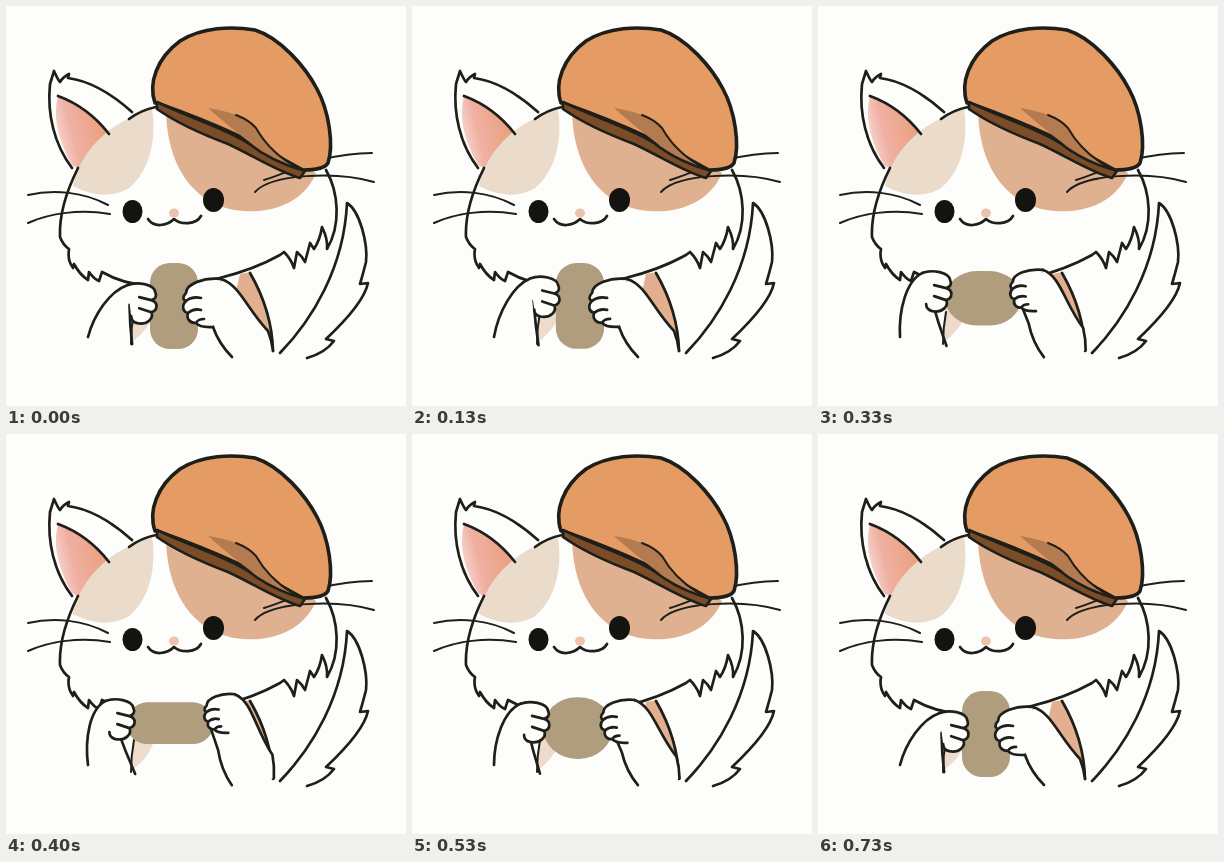
Write an HTML page without scripts that moves like this. It is 400 by 400 pixels and loops after 800 ms.

```html
<!DOCTYPE html>
<html lang="en">
<head>
<meta charset="utf-8">
<title>Cat with dough</title>
<style>
  @property --k { syntax: "<number>"; inherits: true; initial-value: 0; }
  @keyframes knead { from { --k: 0; } to { --k: 12; } }

  html, body { margin: 0; width: 100%; height: 100%; overflow: hidden; background: #fdfdfc; }

  /* --k counts twelve drawings; every moving part follows from it */
  svg {
    display: block; width: 100vw; height: 100vh;
    animation: knead 800ms steps(12) -4ms infinite;
    --pull: pow(cos((var(--k) - 6.3) * 15deg), 6);
    --lift: sin((var(--k) + .5) * 15deg);
    --round: calc(4 * var(--pull) * (1 - var(--pull)));
    --left: calc(-6 * var(--lift) - 17 * var(--pull));
  }

  .line { fill: none; stroke: #1f1f1a; stroke-width: 2.7; stroke-linecap: round; stroke-linejoin: round; }
  .thin { stroke-width: 2; }
  .skin { fill: #fdfdfc; }
  .line * { vector-effect: non-scaling-stroke; }

  #dough {
    --w: calc(48px + 40px * var(--pull));
    --h: calc(86px - 45px * var(--pull));
    width: var(--w);
    height: var(--h);
    x: calc(168px - 4px * var(--pull) - var(--w) / 2);
    y: calc(300px - 11px * var(--pull) - var(--h) / 2);
    rx: calc(20px + 14px * var(--round));
    ry: calc(20px + 20px * var(--round));
  }
  #armL {
    transform-origin: 82px 331px;
    transform: matrix(1, 0, calc(var(--left) / -50), calc(1 + .28 * var(--lift)), 0, 0);
  }
  #pawL { transform: translate(calc(1px * var(--left)), calc(-14px * var(--lift))); }
  #armR {
    transform-origin: 226px 350px;
    transform: matrix(1, 0, calc(-.18 * var(--pull)), calc(1 + .17 * var(--pull)), 0, 0);
  }
  #pawR {
    transform-origin: 180px 273px;
    transform: translate(calc(21px * var(--pull)), calc(-13px * var(--pull))) scale(calc(1 - .2 * var(--pull)));
  }
</style>
</head>
<body>
<svg viewBox="0 0 400 400">
  <defs>
    <linearGradient id="ear" x1="0" y1=".65" x2=".8" y2=".4">
      <stop offset="0" stop-color="#f8dad4"/>
      <stop offset=".4" stop-color="#f0b0a2"/>
      <stop offset="1" stop-color="#eaa283"/>
    </linearGradient>
  </defs>

  <!-- tail and body -->
  <path class="line" d="M274 347C306 314 338 262 341 197C354 205 362 238 360 256Q357 268 354 278L362 277C358 296 336 318 320 333L328 335Q319 347 301 352"/>
  <path fill="#e2b08e" d="M234 268L245 266Q263 296 267 334L229 290Z"/>
  <path class="line" d="M244 267Q266 305 267 345"/>
  <path fill="#eddccc" d="M127 302L149 302Q146 321 126 336Z"/>
  <path class="line thin" d="M128 306Q125 322 125 338"/>

  <!-- ear and face -->
  <path fill="url(#ear)" d="M52 90Q82 101 104 128Q86 140 73 163L66 159Q44 120 52 90Z"/>
  <path fill="#ebdbca" d="M124 112Q134 105 146 103C151 134 143 166 123 182C105 193 84 189 67 180C72 152 96 124 124 112Z"/>
  <path fill="#dfb191" d="M160 105C161 150 178 182 208 198C240 212 293 208 310 167L240 130Z"/>
  <g class="line">
    <path d="M66 162C48 138 41 108 44 78L48 65Q52 74 54 76Q57 71 63 68L62 72C85 75 107 89 126 106"/>
    <path d="M52 90Q82 101 103 128"/>
    <path d="M123 113Q135 104 150 101"/>
    <path d="M72 162C62 182 53 208 54 231Q57 239 63 243Q61 254 67 262L68 258Q74 269 82 274L83 266Q88 273 93 275L96 266C110 274 125 279 145 280C190 281 240 268 274 249L278 246Q285 253 288 262L291 246Q296 250 299 256Q302 245 304 237L308 243Q314 234 316 221Q322 233 321 243C335 219 333 187 320 164"/>
    <path d="M142 213C148 222 161 220 168 213C175 219 190 219 195 210"/>
  </g>
  <g class="line thin">
    <path d="M22 189C48 183 78 186 102 199"/>
    <path d="M22 217C44 207 74 203 104 208"/>
    <path d="M249 186C265 168 330 165 368 176"/>
    <path d="M258 174C282 167 316 147 366 147"/>
  </g>
  <g fill="#13130f">
    <ellipse cx="126.500" cy="205.500" rx="10" ry="11.500"/>
    <ellipse cx="207.500" cy="194" rx="10.500" ry="12"/>
  </g>
  <ellipse cx="168" cy="207" rx="5" ry="4.500" fill="#edc4ab"/>

  <!-- beret -->
  <path class="line" style="fill:#e59b64;stroke-width:3.6" d="M149 97C142 77 151 52 174 35C196 21 226 20 249 24C275 32 300 62 311 83C323 105 328 139 322 157Q318 164 297 164C265 147 238 128 151 97Z"/>
  <path fill="#b57b50" d="M202 102Q232 106 249 120Q262 146 290 162Q266 157 246 138Q222 120 202 102Z"/>
  <path class="line thin" d="M230 109Q243 114 250 122Q264 147 292 162"/>
  <path class="line" style="fill:#7a4d28" d="M151 96C184 112 219 122 242 137Q266 156 299 165L294 172C270 165 248 150 222 138C190 126 168 115 151 103Z"/>

  <!-- dough, arms and paws -->
  <rect id="dough" fill="#af9d7e"/>
  <g class="line skin">
    <path id="armL" d="M82 331C88 310 104 287 122 281L130 280M126 338Q124 320 124 300"/>
    <path id="pawL" d="M122 281C132 277 149 280 150 288C152 292 150 295 146 296C153 298 153 306 146 308C149 314 142 321 132 319C128 318 126 315 126 312M146 296L134 293M146 308L134 304"/>
    <path id="armR" d="M226 351Q213 338 207 321L195 300L215 273C234 279 240 302 262 325Q266 335 267 345"/>
    <path id="pawR" d="M215 273C198 271 180 278 180 287C176 291 177 294 180 295C175 300 177 306 182 307C180 313 184 317 190 317C194 322 202 321 207 321M180 295Q186 290 195 292M182 307Q188 302 195 304M190 317Q192 313 198 313"/>
  </g>
</svg>
</body>
</html>
```
